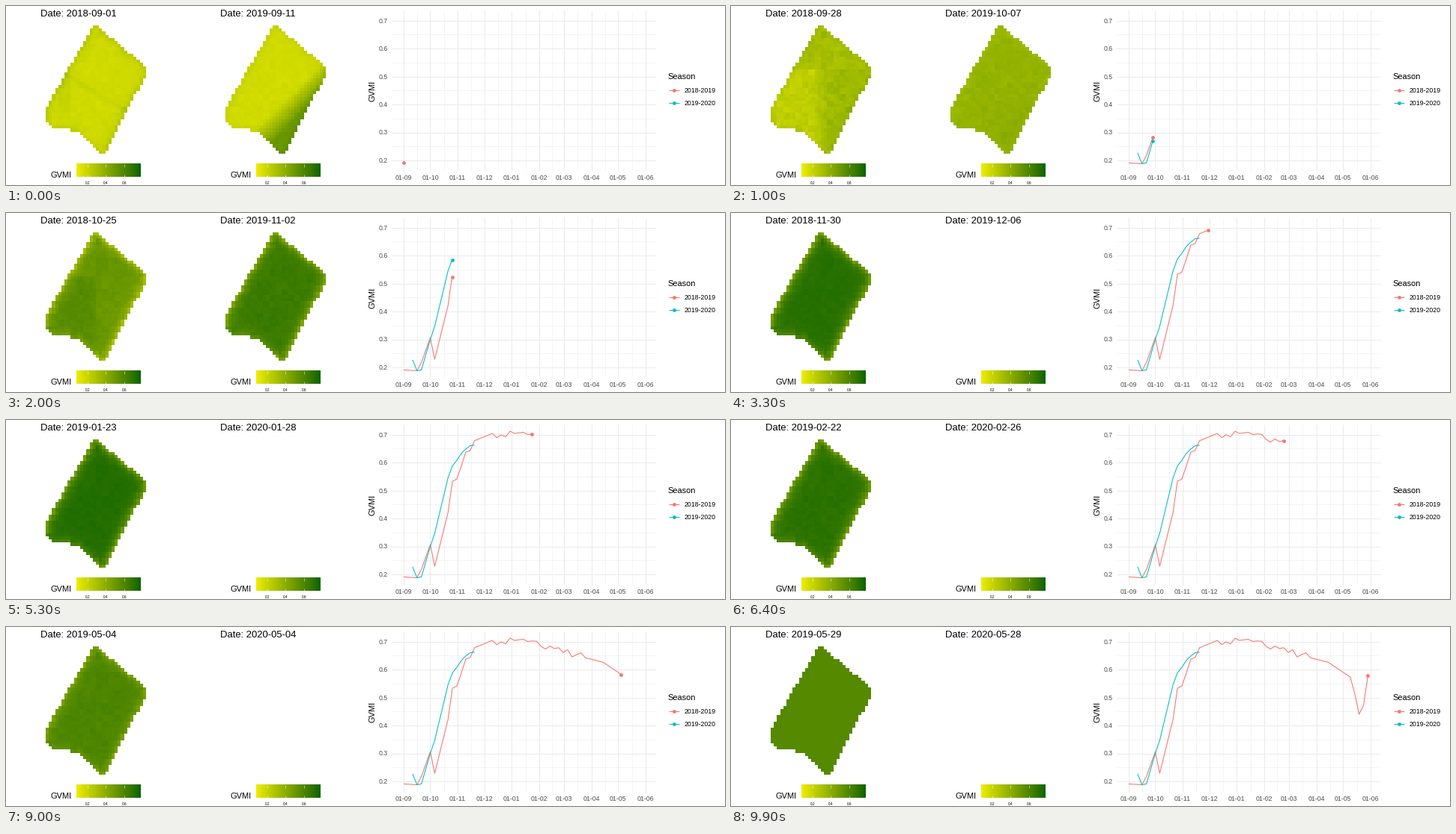
Recreate the animation shown at these times as a matplotlib script. Size 960x240 px, loop 10 s.

```python
import matplotlib.pyplot as plt
import numpy as np
from matplotlib.animation import FuncAnimation
from matplotlib.path import Path

W, H, DPI = 960, 240, 100
FRAMES, INTERVAL = 100, 100
PX = 72 / DPI
RED, TEAL, GREY = "#F8766D", "#00BFC4", "#4D4D4D"
LOW, HIGH = 0.078, 0.78

plt.rcParams["font.family"] = "Liberation Sans"
fig = plt.figure(figsize=(W / DPI, H / DPI), dpi=DPI, facecolor="white")
ax = fig.add_axes([0, 0, 1, 1])


def label(x, y, s, size, **kw):
    return ax.text(x, y, s, fontsize=size * PX, **kw)


# Colour ramp blended in Lab space
RGB_XYZ = np.array([[0.4124, 0.3576, 0.1805],
                    [0.2126, 0.7152, 0.0722],
                    [0.0193, 0.1192, 0.9505]])
WHITE = RGB_XYZ.sum(axis=1)


def to_roots(rgb):
    c = np.array(rgb) / 255
    lin = np.where(c <= 0.04045, c / 12.92, ((c + 0.055) / 1.055) ** 2.4)
    return np.cbrt(RGB_XYZ @ lin / WHITE)


def ramp(n):
    t = np.linspace(0, 1, n)[:, None]
    roots = to_roots((238, 238, 0)) * (1 - t) + to_roots((0, 100, 0)) * t
    lin = np.clip((roots ** 3 * WHITE) @ np.linalg.inv(RGB_XYZ).T, 0, 1)
    return np.where(lin <= 0.0031308, lin * 12.92,
                    1.055 * lin ** (1 / 2.4) - 0.055).clip(0, 1)


RAMP = ramp(256)


def colours(v):
    i = np.clip((v - LOW) / (HIGH - LOW) * 255, 0, 255).astype(int)
    return RAMP[i]


# Season curves: days since 1 September and mean index
DAYS_A = np.array([0, 15, 20, 30, 35, 50, 55, 60, 65, 70, 75, 80, 90, 100, 105,
                   110, 115, 120, 125, 135, 140, 145, 150, 155, 160, 165, 170,
                   175, 180, 185, 190, 195, 200, 205, 225, 250, 255, 260, 265, 270])
VALS_A = np.array([.191, .188, .218, .306, .229, .421, .533, .541, .587, .637,
                   .643, .678, .691, .704, .689, .699, .692, .712, .704, .708,
                   .700, .702, .701, .683, .673, .684, .675, .678, .661, .671,
                   .645, .653, .660, .642, .626, .573, .515, .440, .472, .579])
DAYS_B = np.array([10, 15, 20, 30, 35, 50, 55, 60, 65, 70, 75, 80])
VALS_B = np.array([.227, .188, .191, .300, .347, .545, .588, .608, .632, .648,
                   .660, .662])

# Field geometry on a grid of square cells
COLS, ROWS = 32, 41
X0, X1, Y0, Y1 = 53, 187, 26, 198
gx, gy = np.meshgrid(X0 + (np.arange(COLS) + 0.5) * (X1 - X0) / COLS,
                     Y0 + (np.arange(ROWS) + 0.5) * (Y1 - Y0) / ROWS)
outline = Path([(118, 24), (187, 81), (187, 92), (131, 200), (126, 199),
                (96, 168), (64, 163), (52, 151), (52, 139)])
inside = outline.contains_points(np.c_[gx.ravel(), gy.ravel()]).reshape(gx.shape)


def edge_depth(mask):
    depth, m = np.zeros(mask.shape), mask.copy()
    while m.any():
        p = np.pad(m, 1)
        m = m & p[:-2, 1:-1] & p[2:, 1:-1] & p[1:-1, :-2] & p[1:-1, 2:]
        depth += m
    return depth


rng = np.random.default_rng(4)


def grain():
    fine = rng.normal(size=(ROWS, COLS))
    coarse = rng.normal(size=(ROWS // 2 + 1, COLS // 2 + 1))
    coarse = coarse.repeat(2, 0).repeat(2, 1)[:ROWS, :COLS]
    return 0.5 * fine + 0.8 * coarse


EDGE = np.exp(-edge_depth(inside) / 1.3) * (0.8 + 0.2 * rng.random(gx.shape))
EDGE *= np.where((gy > 152) & (gx < 122), 0.5, 1)
HALVES = np.where(gy < 85, 0.5, np.tanh((gx - 119) / 8))
STREAK = (np.exp(-((gy - 95 - 0.6 * (gx - 85)) / 4) ** 2)
          + 0.9 * ((gx > 68) & (gx < 86) & (gy > 90) & (gy < 142)))
CORNER = np.clip((gx + gy - 258) / 40, 0, 1)
GRAIN_A, GRAIN_B = grain(), grain()


def field_a(day):
    keys = [0, 27, 54, 90, 144, 204, 262, 270]

    def k(*v):
        return np.interp(day, keys, v)
    return (np.interp(day, DAYS_A, VALS_A)
            + k(-.015, 0, .02, .025, .025, .03, .02, 0)
            + k(.08, .03, -.2, -.25, -.24, -.2, -.12, 0) * EDGE
            + k(0, .055, -.03, 0, 0, 0, 0, 0) * HALVES
            + k(.03, 0, 0, 0, 0, 0, 0, 0) * STREAK
            + k(.008, .02, .012, .007, .007, .01, .01, 0) * GRAIN_A)


def field_b(day):
    keys = [0, 5, 10, 26, 52, 71]

    def k(*v):
        return np.interp(day, keys, v)
    return (np.interp(day + 10, DAYS_B, VALS_B)
            + k(-.055, -.015, 0, .01, .04, .04)
            + k(.04, .03, 0, -.03, -.22, -.24) * EDGE
            + k(.33, .1, .04, .025, 0, 0) * CORNER
            + k(.008, .008, .01, .012, .01, .008) * GRAIN_B)


def rgba(v):
    return np.dstack([colours(v), inside])


def add_map(dx):
    img = ax.imshow(np.zeros((ROWS, COLS, 4)), extent=(X0 + dx, X1 + dx, Y1, Y0),
                    interpolation="nearest", aspect="auto", zorder=2)
    title = label(46 + dx, 14, "", 13)
    label(60 + dx, 230, "GVMI", 11)
    ax.imshow(RAMP[None], extent=(94 + dx, 180 + dx, 229.5, 212),
              interpolation="nearest", aspect="auto", zorder=2)
    for v in (0.2, 0.4, 0.6):
        x = 94 + dx + (v - LOW) / (HIGH - LOW) * 86
        for y in (212, 226):
            ax.plot([x, x], [y, y + 3.5], color="white", lw=0.5 * PX, zorder=3,
                    solid_capstyle="butt")
        label(x, 238.8, f"{v}", 4.8, ha="center")
    return img, title


def px(day):
    return 531 + np.asarray(day) * 1.1832


def py(v):
    return 207 - (np.asarray(v) - 0.2) * 375


def grid_line(xs, ys, lw):
    ax.plot(xs, ys, color="#EBEBEB", lw=lw * PX, solid_capstyle="butt", zorder=1)


def add_chart():
    months = np.array([0, 30, 61, 91, 122, 153, 181, 212, 242, 273])
    for d in (months[1:] + months[:-1]) / 2:
        grid_line([px(d)] * 2, [5.5, 221], 0.53)
    for v in np.arange(0.25, 0.7, 0.1):
        grid_line([515, 867], [py(v)] * 2, 0.53)
    for i, d in enumerate(months):
        grid_line([px(d)] * 2, [5.5, 221], 1.07)
        label(px(d), 233, f"01-{(i + 8) % 12 + 1:02d}", 8.8, ha="center", color=GREY)
    for i in range(2, 8):
        v = i / 10
        grid_line([515, 867], [py(v)] * 2, 1.07)
        label(510, py(v) + 3, f"{v:.1f}", 8.8, ha="right", color=GREY)
    label(489.5, 114, "GVMI", 11, rotation=90, ha="center", va="center")
    label(883, 98, "Season", 11)
    for y, c, s in ((113, RED, "2018-2019"), (130, TEAL, "2019-2020")):
        ax.plot([885, 899], [y, y], color=c, lw=1.07 * PX, solid_capstyle="butt")
        ax.plot([892], [y], "o", color=c, ms=4.8 * PX, mew=0)
        label(906, y + 3.2, s, 8.8)


def add_series(colour):
    line, = ax.plot([], [], color=colour, lw=1.07 * PX, zorder=4,
                    solid_capstyle="butt")
    dot, = ax.plot([], [], "o", color=colour, ms=4.8 * PX, mew=0, zorder=5)
    return line, dot


def reveal(series, days, vals, now):
    line, dot = series
    if now < days[0]:
        line.set_data([], [])
        dot.set_data([], [])
        return
    tip = min(now, days[-1])
    past = days < tip
    v = np.interp(tip, days, vals)
    line.set_data(px(np.r_[days[past], tip]), py(np.r_[vals[past], v]))
    if now <= days[-1]:
        dot.set_data([px(tip)], [py(v)])
    else:
        dot.set_data([], [])


img_a, title_a = add_map(0)
img_b, title_b = add_map(240)
add_chart()
series_a, series_b = add_series(RED), add_series(TEAL)
ax.set_xlim(0, W)
ax.set_ylim(H, 0)
ax.axis("off")


def show_date(title, start, days):
    title.set_text(f"Date: {np.datetime64(start) + int(days)}")


def update(i):
    day_a, day_b = 270 * i / (FRAMES - 1), 260 * i / (FRAMES - 1)
    show_date(title_a, "2018-09-01", day_a)
    show_date(title_b, "2019-09-11", day_b)
    img_a.set_data(rgba(field_a(day_a)))
    img_b.set_visible(day_b < 71)
    if day_b < 71:
        img_b.set_data(rgba(field_b(day_b)))
    reveal(series_a, DAYS_A, VALS_A, day_a)
    reveal(series_b, DAYS_B, VALS_B, day_a)
    return img_a, img_b, title_a, title_b, *series_a, *series_b


anim = FuncAnimation(fig, update, frames=FRAMES, interval=INTERVAL,
                     repeat=True, repeat_delay=0, blit=False)
plt.show()
```
